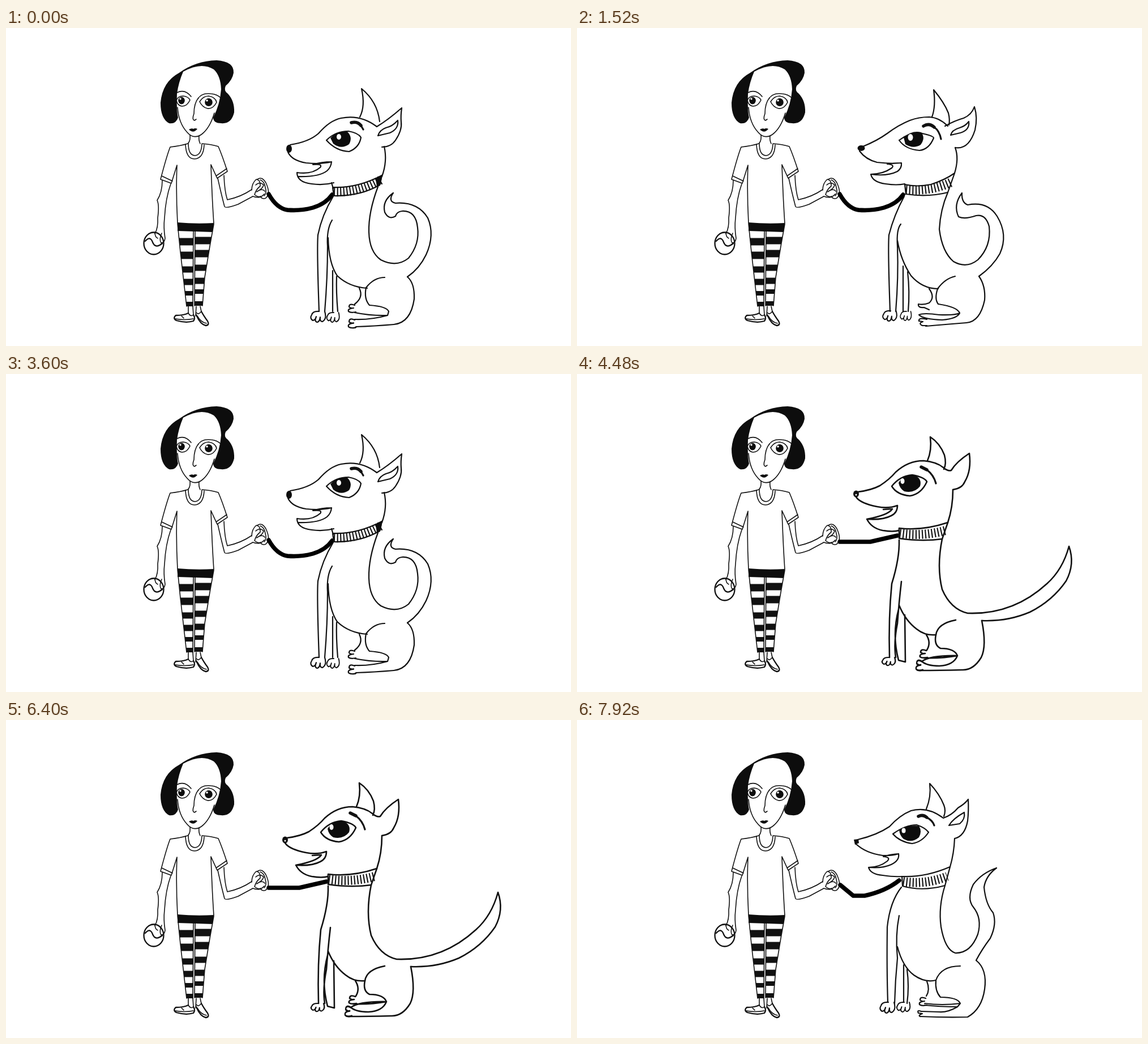
An HTML page without scripts that plays this animation: 998x561 px, repeating every 8000 ms.

```html
<!DOCTYPE html>
<html lang="en">
<head>
<meta charset="utf-8">
<title>Walk the dog</title>
<style>
html, body { margin: 0; width: 100%; height: 100%; overflow: hidden; background: #fff; }
svg { display: block; width: 100vw; height: 100vh; }
path, ellipse, circle { fill: none; stroke: #111; stroke-linecap: round; stroke-linejoin: round; }
.person { stroke-width: 1.6; }
.dog { stroke-width: 2.2; }
.c { stroke-width: 2.6; }
.person path, .person ellipse, .dog path, .dog ellipse { stroke-width: inherit; }
svg .ink { fill: #0d0d0d; stroke: none; }
svg .shine { fill: #fff; stroke: none; }
svg .leash { stroke: #000; stroke-width: 7.5; stroke-linecap: round; }
svg .bold { stroke-width: 2.3; }
svg .brow { stroke-width: 5.5; }
svg .tail { stroke-width: 3.2; }
svg .ticks { stroke-width: 16; stroke-linecap: butt; stroke-dasharray: 2.1 3.5; }
svg .bands { stroke-width: 11; stroke-linecap: butt; }

/* a few ms early so hard cuts land cleanly */
.calm, .eager, .a, .b, .c, .d, .taut, .slack { animation: 8s step-end -4ms infinite; }
.calm { animation-name: first; }
.eager { animation-name: second; }
.a { animation-name: sitA; animation-duration: .4s; }
.b { animation-name: sitB; animation-duration: .4s; }
.c, .d { animation-duration: .16s; }
.taut, .slack { animation-duration: .32s; }
.c, .taut { animation-name: first; }
.d, .slack { animation-name: second; }
@keyframes first { 0% { opacity: 1 } 50%, 100% { opacity: 0 } }
@keyframes second { 0% { opacity: 0 } 50%, 100% { opacity: 1 } }
@keyframes sitA {
  0%, 60% { opacity: 1; transform: none }
  20%, 80%, 100% { opacity: 0; transform: none }
  40% { opacity: 1; transform: translate(1px, .5px) }
}
@keyframes sitB { 0%, 40%, 60% { opacity: 0 } 20%, 80%, 100% { opacity: 1 } }
</style>
</head>
<body>
<svg viewBox="0 0 998 561" preserveAspectRatio="none">
<defs>
  <path id="paw" d="M0 0Q-11 -1 -13 6 -17 12 -11 16 -6 15 -5 9 -9 18 -3 19 1 18 2 10 1 18 6 18 13 14 11 4L10 0"/>
  <path id="toes" d="M0 0Q-10 -4 -10 3 -7 6 -2 5 -13 6 -11 11 -7 14 2 12"/>
  <clipPath id="legs">
    <path d="M303 345L308 395 319 491H330L331 357H334L333 490H347L351 440 360 385 367 346Z"/>
  </clipPath>
</defs>

<g class="person">
  <!-- head -->
  <path class="ink" d="M302 116Q301 145 304 158 300 170 288 168 273 160 273 132 276 95 306 79 335 58 372 57 403 59 402 79 400 92 388 102 384 111 392 116 404 129 403 149 398 170 380 168 366 168 366 158 378 135 380 108 379 84 367 73 345 59 313 77 305 95 302 116"/>
  <path d="M303 140Q305 168 320 184 331 197 345 188 360 177 368 150"/>
  <path d="M302 114Q316 107 327 121M339 125Q345 114 362 116 373 117 379 123M340 123Q332 133 332 151 328 162 333 163L336 161"/>
  <path d="M301 128Q303 120 313 120 322 121 325 127 320 138 311 138 303 137 301 128M342 130Q348 120 358 120 370 122 372 131 366 143 356 142 347 140 342 130"/>
  <ellipse class="ink" cx="310" cy="128" rx="5.8" ry="6.5"/>
  <ellipse class="ink" cx="358" cy="131" rx="6.8" ry="7"/>
  <circle class="shine" cx="308" cy="125" r="1.7"/>
  <circle class="shine" cx="355" cy="128" r="1.8"/>
  <path class="ink" d="M323 179Q328 176 331 178 334 176 338 178 331 187 323 179"/>
  <!-- shirt -->
  <path d="M325 189Q326 198 322 203M341 190Q340 198 343 204"/>
  <path d="M317 205Q318 231 333 231 349 230 350 206M322 203Q322 225 334 225 345 224 346 205"/>
  <path d="M321 204Q308 208 290 210 284 225 273 267L292 274 302 242Q300 290 303 344M275 261L294 270M346 204Q362 205 375 209 382 225 391 253L373 265 362 241Q364 300 367 345M371 261L390 248"/>
  <!-- arms -->
  <path d="M276 269Q276 290 267 304 271 312 268 335 269 352 263 363M291 275Q282 300 280 335 278 352 281 371 280 379 274 379 270 374 275 362"/>
  <ellipse class="bold" cx="261" cy="380" rx="17.5" ry="19.5"/>
  <path class="bold" d="M246 376Q255 366 259 378 264 390 276 380"/>
  <path d="M263 360Q263 369 268 371"/>
  <path d="M374 265Q380 292 386 315 388 319 410 311L436 297M385 260Q386 288 391 303 415 298 434 285"/>
  <path d="M434 286Q434 274 442 267 450 268 449 279 442 284 439 294 449 302 456 293M436 297Q445 300 449 298M441 277Q449 270 455 277 453 284 444 288M443 289Q453 282 457 288"/>
  <path d="M444 267Q452 261 459 273 468 292 459 300 453 303 449 297M449 268Q456 270 458 281 461 291 456 296"/>
  <!-- trousers -->
  <path class="ink" d="M303 343Q335 346 367 344L365 360 303 358Z"/>
  <g clip-path="url(#legs)">
    <path class="bands" style="stroke-width:13" d="M300 377H331M333 375H370M300 401H331M333 398H370"/>
    <path class="bands" d="M300 426H331M333 423H370M300 448H331M333 446H370"/>
    <path class="bands" style="stroke-width:8" d="M300 468H331M333 465H370M300 487H331M333 486H370"/>
  </g>
  <path d="M303 345L308 395 319 491M331 357L330 491M334 357L333 490M367 346L360 385 351 440 347 490"/>
  <!-- shoes -->
  <path class="bold" d="M322 503Q314 507 300 507 294 512 301 516 318 521 331 517 335 512 331 506M336 506Q343 523 353 525 360 524 356 517 350 509 345 500"/>
  <path d="M322 491V503Q326 510 331 506L330 491M299 513Q315 516 331 513M336 491L335 508M343 491L345 500Q340 507 336 502M338 508Q344 519 354 521M310 508L314 512"/>
</g>

<g class="calm">
  <path class="leash" d="M464 293Q478 318 497 321 520 323 542 317 565 310 576 294"/>
  <g class="dog a">
    <ellipse class="ink" cx="500" cy="213" rx="5" ry="7"/>
    <path d="M502 206Q535 201 552 186 572 163 592 159 626 152 655 174M625 157Q635 138 628 107 656 130 660 165M655 174Q675 162 699 141 697 155 698 166 700 180 688 198 680 210 664 210M657 190Q660 180 671 176 682 174 692 163 694 178 678 185Z"/>
    <path d="M498 219Q505 234 530 238 555 241 575 236 574 246 567 252 553 263 516 262M575 236Q558 236 542 241 560 239 555 246 540 259 514 255 514 272 540 275 560 278 579 273M575 273L578 283"/>
    <path d="M566 198Q582 182 605 182 622 185 627 193 624 211 606 218 583 217 566 198"/>
    <path class="ink" d="M573 194Q585 181 603 183 613 193 606 205 592 215 578 204Z"/>
    <ellipse class="shine" cx="588" cy="192" rx="4" ry="5"/>
    <path class="brow" d="M610 167Q621 164 627 172"/>
    <path class="tail" d="M627 172L631 179"/>
    <path d="M577 281Q620 283 664 260L660 277Q625 297 579 296Z"/>
    <path class="ticks" d="M579 289Q622 291 662 268"/>
    <path class="ink" d="M653 266L665 258 662 276 655 280Z"/>
    <path d="M668 209Q674 235 664 262M657 280Q640 325 641 360 642 395 662 409 690 423 711 406 731 381 727 352 724 322 700 323 690 324 688 332 676 339 669 325 664 305 684 291 674 306 688 309 727 306 745 335 758 365 742 400 730 425 709 439"/>
    <path d="M709 439Q722 450 721 478 715 520 685 523 650 526 618 527M578 297Q558 330 551 365 549 390 553 500M576 339Q566 355 568 385 568 440 563 500M569 370Q570 415 585 437 606 457 638 459M577 428V500M584 438Q583 465 586 500"/>
    <path d="M669 440Q650 440 636 458 632 478 642 489 672 491 676 500L674 507Q645 508 616 502M624 459Q632 475 616 487M674 507Q645 515 616 514"/>
    <use href="#paw" x="553" y="500"/>
    <use href="#paw" transform="translate(579 502) scale(.85 .9)"/>
    <use href="#toes" x="616" y="489"/>
    <use href="#toes" transform="translate(616 515) scale(1 1.1)"/>
  </g>
  <g class="dog b">
    <ellipse class="ink" cx="502" cy="212" rx="6.5" ry="5"/>
    <path d="M505 209Q530 199 548 186 568 171 588 163 604 157 622 157 640 158 655 173M627 157Q634 138 630 109 649 132 656 150 659 162 657 171M650 173Q668 163 683 159 697 153 702 139 708 158 703 180 692 215 668 211M660 189Q662 180 676 176 686 173 692 165 694 180 677 185Z"/>
    <path d="M499 217Q510 232 530 237 555 240 573 238 574 247 566 253 548 262 519 258 522 272 545 275 565 278 579 275M573 238Q558 238 548 240 562 241 556 247 540 258 519 258"/>
    <path d="M569 198Q592 180 614 187 630 191 630 194 622 214 605 216 580 214 569 198"/>
    <path class="ink" d="M577 193Q592 180 608 184 616 194 607 206 594 214 580 205Z"/>
    <ellipse class="shine" cx="589" cy="193" rx="4.5" ry="6"/>
    <path class="brow" d="M612 173Q622 167 631 175"/>
    <path class="tail" d="M631 175Q640 181 643 196"/>
    <path d="M579 276Q600 281 625 276 650 268 667 256L655 290Q620 299 581 293Z"/>
    <path class="ticks" d="M581 285Q625 289 661 272"/>
    <path d="M668 211Q675 230 667 256M655 290Q642 320 640 355 645 395 665 412 688 425 708 409 732 385 728 350 722 328 705 331 685 338 674 333 664 312 680 291 679 308 690 312 725 305 742 332 762 365 747 398 735 420 710 438"/>
    <path d="M710 438Q722 455 720 480 712 518 688 520 650 523 616 526M578 297Q560 330 551 365 549 390 553 500M572 346Q564 355 566 385 568 440 563 500M566 375Q572 410 590 437 610 460 638 460M576 420V500M584 430Q588 465 585 500"/>
    <path d="M668 438Q650 442 637 460 631 478 638 487 672 492 676 503 671 513 645 515 612 514 604 506 612 502 640 506 668 507 676 503M622 460Q633 475 622 485 612 489 603 487 602 494 613 493L622 497"/>
    <use href="#paw" transform="translate(554 499) scale(.95)"/>
    <use href="#paw" transform="translate(582 500) scale(.75 .85)"/>
    <path d="M618 514Q603 510 604 517L611 518Q602 521 610 525H618"/>
  </g>
</g>

<g class="eager">
  <g class="dog c">
    <path class="leash taut" d="M464 296H518L566 285"/>
    <path class="leash slack" d="M465 292Q480 301 525 301 548 297 566 285"/>
    <ellipse class="ink" cx="493" cy="211.500" rx="5" ry="6"/>
    <circle class="shine" cx="493" cy="213" r="1.5"/>
    <path d="M496 208Q520 205 535 197 552 186 563 173 585 153 612 153 635 155 647 165 655 172 661 170M619 153Q627 135 624 111 641 122 649 143 653 158 648 168M661 170Q670 155 693 140 697 170 685 190 680 202 664 204"/>
    <path d="M493 217Q500 228 530 234 550 238 566 232 566 245 555 250 540 258 512 256 520 272 540 276 558 279 569 276M541 239L557 238Q550 249 512 256"/>
    <path d="M556 198Q570 180 592 178 614 182 618 190 608 212 588 215 565 213 556 198"/>
    <path class="ink" d="M568 192Q576 178 595 178 610 184 606 198 596 211 578 207 570 202 568 192"/>
    <ellipse class="shine" cx="575" cy="189" rx="3.5" ry="5"/>
    <path class="brow" d="M608 164L618 169"/>
    <path class="tail" d="M618 169Q630 178 634 193"/>
    <path d="M569 272Q610 277 655 262L645 291Q610 296 569 290Z"/>
    <path class="ticks" d="M570 281Q610 287 651 276"/>
    <path d="M664 204Q664 235 655 262M645 291Q635 340 645 380 660 415 690 422 770 425 830 370 858 345 869 304 880 335 864 365 840 400 800 420 760 437 715 435"/>
    <path d="M715 435Q724 480 714 500 700 523 680 522 640 523 605 523M569 293Q570 325 556 370 550 430 552 500M573 366Q569 400 566 440 559 475 563 500M569 408Q580 435 600 450 615 462 634 460 637 440 669 434M568 415Q556 460 568 505L580 508 579 425"/>
    <path d="M634 460Q630 478 642 484 667 484 672 497 665 514 640 515 618 515 609 507 625 496 672 497M617 460Q626 474 618 487M613 501Q645 502 672 497"/>
    <use href="#paw" transform="translate(552 500) scale(.9 .75)"/>
    <use href="#toes" x="617" y="488"/>
    <use href="#toes" transform="translate(609 507) scale(.9 1.25)"/>
  </g>
  <g class="dog d">
    <path class="leash" d="M465 291L488 310H508Q545 302 569 283"/>
    <path class="ink" d="M489 211L497 210 498 217 491 220Z"/>
    <path d="M496 211Q530 203 552 188 570 168 590 160 620 152 647 173M617 157Q626 135 623 112 640 130 648 150 652 160 648 170M647 173Q662 168 673 155 685 148 691 140 692 160 690 178 685 205 667 209M657 186Q664 174 684 163 686 175 676 183Z"/>
    <path d="M492 218Q510 235 540 239 555 240 568 236 570 248 555 255 540 262 515 260 518 272 540 274 560 277 574 276M568 236Q552 237 541 241 555 242 548 249 534 260 515 260"/>
    <path d="M558 201Q580 185 600 185 615 190 621 198 610 215 592 218 570 215 558 201"/>
    <path class="ink" d="M569 194Q585 184 604 187 610 196 604 207 591 218 577 210 570 204 569 194"/>
    <ellipse class="shine" cx="577" cy="195" rx="3.5" ry="4.5"/>
    <path class="brow" d="M603 170Q611 166 618 172"/>
    <path class="tail" d="M618 172Q628 177 631 186"/>
    <path d="M574 276Q615 278 659 259L650 292Q610 303 575 293Z"/>
    <path class="ticks" d="M576 285Q615 291 654 276"/>
    <path d="M667 209Q666 235 659 259M650 292Q638 330 643 365 650 405 668 411 695 412 708 378 716 350 700 330 688 315 700 290 715 270 741 261 722 275 719 295 722 325 735 340 742 360 730 385 715 405 705 424"/>
    <path d="M705 424Q725 440 720 475 715 510 690 524 650 525 606 523M573 295Q553 320 548 365 547 440 549 498M569 345Q562 380 566 420 562 460 561 500M566 400Q575 435 595 450 615 464 634 459 643 434 677 434M577 432V498M583 440Q587 470 583 500"/>
    <path d="M634 459Q632 478 642 489 672 489 677 500L672 506Q640 506 614 503M618 461Q624 476 617 487M614 500Q645 504 677 500M672 506Q655 516 640 515L608 514"/>
    <use href="#paw" x="550" y="498"/>
    <use href="#paw" transform="translate(578 498) scale(.9)"/>
    <use href="#toes" x="616" y="491"/>
    <path d="M608 514Q600 511 603 517L610 518Q602 521 606 523"/>
  </g>
</g>
</svg>
</body>
</html>
```
